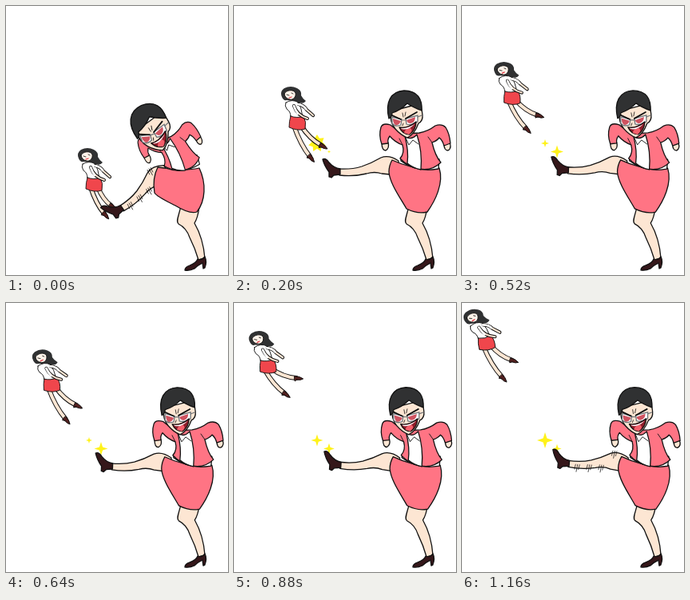
These frames come from a looping animation (278x337 px, 1.2 s). An HTML page:

```html
<!DOCTYPE html>
<html lang="en">
<head>
<meta charset="utf-8">
<title>Kick</title>
<style>
html, body { margin: 0; width: 100%; height: 100%; overflow: hidden; background: #fff; }
svg { display: block; width: 100vw; height: 100vh; }
.ink { stroke: #111; stroke-width: 1.3; stroke-linejoin: round; stroke-linecap: round; }
.thin { stroke-width: .9; }
.pink { fill: #ff7484; }
.red { fill: #f0464c; }
.skin { fill: #fde6d3; }
.white { fill: #fff; }
.hair { fill: #303132; }
.shoe { fill: #35171a; }
.line { fill: none; stroke: #111; stroke-linecap: round; stroke-linejoin: round; }
.limb { fill: none; stroke: #fde6d3; stroke-linecap: round; stroke-linejoin: round; }
.gold { fill: #fff21a; }
</style>
</head>
<body>
<svg viewBox="0 0 278 337">
  <path id="burst" class="gold"/>
  <path id="sparkA" class="gold"/>
  <path id="sparkB" class="gold"/>

  <g id="girl">
    <g id="legs"></g>
    <g id="body">
      <path class="hair" d="M-11,3 Q-14,-4 -8,-8 Q0,-12 8,-8 Q14,-5 13,1 Q15,5 19,8 Q16,12 11,10 Q7,13 4,8 L-5,7 Q-9,8 -11,3 Z"/>
      <path class="white ink thin" d="M-6,10 Q2,5 10,10 L13,18 L15,28 Q8,31 0,28 Q0,21 -5,18 Q-8,14 -6,10 Z"/>
      <path class="red ink thin" d="M0,27 Q8,30 16,27 Q20,34 18,43 Q9,46 -2,41 Q-2,33 0,27 Z"/>
      <g id="arms"></g>
      <path class="ink thin" fill="#fff4ea" d="M-8,-1 C-6,-6 4,-7 6,-2 C7,3 3,7 -1,6 Q-7,5 -8,-1 Z"/>
      <path class="line" stroke-width=".8" d="M-5,0 l3,1 M1,-2 l2,1"/>
      <path class="line" style="stroke:#e03540" stroke-width="1.3" d="M-2,4 l3,-1"/>
    </g>
  </g>

  <g id="kicker">
    <g id="kickLeg">
      <path class="skin ink" d="M206,194 Q194,186 184,190 Q172,197 160,201 Q147,205 131,204 L132,212 Q150,214 166,210 Q176,207 185,210 L206,212 Z"/>
      <path class="shoe ink" d="M111,192 Q115,190 119,196 Q125,203 133,204 L133,211 L125,212 L122,215 L119,214 L119,208 Q113,200 111,192 Z"/>
      <path id="shake" class="line" stroke-width=".7"/>
    </g>
    <path class="skin ink" d="M219,250 C217,262 212,270 216,273 Q226,278 230,290 Q237,304 241,318 L249,316 Q247,291 236,272 Q240,266 242,252 Z"/>
    <path class="shoe ink" d="M240,317 Q245,319 249,314 Q252,320 249,328 L247,329 L246,322 Q240,325 236,329 Q230,332 224,331 Q224,327 230,325 Q238,322 240,317 Z"/>
    <path id="skirt" class="pink ink"/>
    <g id="torso">
      <path class="skin ink" d="M185,171 L193,171 Q195,178 190,181 Q185,181 185,171 Z"/>
      <path class="skin ink" d="M263,173 L270,171 Q273,178 268,181 Q263,181 263,173 Z"/>
      <path class="white ink" d="M209,190 L257,192 L256,204 Q228,209 209,194 Z"/>
      <path class="pink ink" d="M216,160 C207,159 201,153 196,149 Q186,146 184,152 Q181,162 185,173 L193,172 Q192,167 195,163 Q202,171 211,174 Q214,184 208,191 Q217,201 232,204 Q248,207 259,196 Q252,188 248,171 Q254,169 257,165 Q261,168 263,175 L271,172 Q270,160 265,152 Q260,147 252,150 Q243,157 232,159 Z"/>
      <path class="white ink" d="M214,163 Q222,169 229,161 Q236,182 234,205 Q224,203 217,197 Q219,182 214,163 Z"/>
      <path class="line" stroke-width=".9" d="M215,165 L219,174 L224,168 L231,173 M211,174 L207,166 M248,171 L243,164"/>
    </g>
    <g id="head">
      <path class="skin ink" d="M196,132 Q195,146 202,154 Q209,162 217,165 Q226,161 231,147 Q237,144 236,136 L234,122 Z"/>
      <path class="hair ink" d="M194,141 C189,121 196,107 213,106 C230,106 236,117 235,131 Q224,127 217,122 Q208,131 198,134 Q198,139 194,141 Z"/>
      <path d="M198,139 L210,142 L209,149 Q202,152 198,147 Z M215,141 L230,137 L230,145 Q222,150 216,148 Z" fill="#fff" stroke="#6d7377" stroke-width="1.3"/>
      <path class="line" style="stroke:#6d7377" stroke-width="1.2" d="M210,143 L215,143 M230,139 L235,137"/>
      <path fill="#cf5360" d="M199,141 L209,144 Q207,150 202,149 Q199,147 199,141 Z M216,143 L227,139 Q227,146 221,147 Q217,147 216,143 Z"/>
      <path class="line" stroke-width="1.8" d="M198,137 L209,142 M229,133 L215,141"/>
      <path class="line" stroke-width=".8" d="M211,134 l1,5 M215,133 l-1,5 M212,147 l-1,3"/>
      <path class="ink" fill="#8e1c29" d="M207,152 Q217,154 228,145 Q228,155 220,161 Q211,161 207,152 Z"/>
      <path fill="#f4606c" d="M213,159 Q214,153 221,153 Q225,156 219,161 Z"/>
      <path fill="#fff" d="M209,153 Q217,154 226,148 L224,150 Q217,156 210,154 Z"/>
    </g>
  </g>
</svg>
<script>
const LOOP = 1200, STEP = 40, HIT = 200, TURN = Math.PI * 2;
const el = id => document.getElementById(id);
const set = (id, name, value) => el(id).setAttribute(name, value);
const clamp = v => Math.max(0, Math.min(1, v));

function star(x, y, r, points = 4, inner = .34) {
  let d = '';
  for (let i = 0; i < points * 2; i++) {
    const a = i * Math.PI / points - Math.PI / 2, q = i % 2 ? r * inner : r;
    d += `${i ? 'L' : 'M'}${x + q * Math.cos(a)},${y + q * Math.sin(a)}`;
  }
  return d + 'Z';
}

const limb = (d, width) => `<path class="line" stroke-width="${width + 2}" d="${d}"/>
  <path class="limb" stroke-width="${width}" d="${d}"/>`;

function girlLeg([hx, hy], fx, fy) {
  const kx = (hx + fx) / 2 - 2, ky = (hy + fy) / 2 + 4;
  const turn = Math.atan2(fy - ky, fx - kx) * 360 / TURN;
  return limb(`M${hx},${hy} Q${kx},${ky} ${fx},${fy}`, 4) +
    `<path class="ink thin" fill="#52201f" transform="translate(${fx},${fy}) rotate(${turn})"
      d="M-2,-2.2 Q4,-3 9,0 Q6,2.5 1,2 L-1,4 L-2,2 Z"/>`;
}

// Clusters of short strokes along the kicking leg
function shakePath() {
  let d = '';
  for (let c = 0; c < 4; c++)
    for (let i = 0; i < 3; i++)
      d += `M${141 + c * 15 + i * 2.5},${c < 3 ? 208 - c : 187}l-1,${6 + i % 2 * 3}`;
  return d;
}

// k = 1 crouched, 0 upright
const skirtPath = k => `M${198 - 8 * k},${193 + 9 * k} Q228,207 ${257 - 15 * k},203
  C${263 - 12 * k},222 ${252 - 2 * k},244 ${242 - 3 * k},258 Q230,261 ${216 - 4 * k},${254 - 4 * k}
  C${208 - 8 * k},${240 + 4 * k} ${195 - 6 * k},${222 + 17 * k} ${194 - 8 * k},${208 + 26 * k}
  Q${194 - 11 * k},${200 + 16 * k} ${198 - 8 * k},${193 + 9 * k} Z`;

function drawGirl(bend, u, sway) {
  const lean = 11 * u + 3 * sway * u;
  const r = lean * TURN / 360;
  const hip = (x, y) => [x * Math.cos(r) + y * Math.sin(r), y * Math.cos(r) - x * Math.sin(r)];
  set('girl', 'transform', `translate(${71 - 57 * u + 31 * bend},${111 - 93 * u + 77 * bend})`);
  set('body', 'transform', `rotate(${-lean})`);
  el('legs').innerHTML =
    girlLeg(hip(4, 39), 24 + 12 * u - 3 * bend, 74 - 3 * u + 4 * sway) +
    girlLeg(hip(13, 39), 39 + 10 * u - sway - 10 * bend, 60 - 10 * u + 4 * sway + 4 * bend);
}

function drawKicker(bend, u) {
  set('kicker', 'transform', `rotate(${.8 * u} 240 325)`);
  set('kickLeg', 'transform',
    `translate(${200 - 4 * bend},${200 + 8 * bend}) rotate(${4.3 * u - 35 * bend}) translate(-200,-200)`);
  set('torso', 'transform',
    `translate(${220 - 7 * bend},${205 + 5 * bend}) rotate(${-20 * bend}) scale(${1 - .12 * bend},1) translate(-220,-205)`);
  set('head', 'transform',
    `translate(${213 - 33 * bend},${133 + 18 * bend}) rotate(${-22 * bend}) scale(${1 + .05 * bend}) translate(-213,-133)`);
  set('skirt', 'd', skirtPath(bend));
}

function drawSparks(t) {
  const pulse = Math.cos(TURN * (t - 640) / 900);
  set('sparkA', 'd', star(104, 172, clamp((t - HIT) / 150) * (7.2 - 3.2 * pulse)));
  set('sparkB', 'd', star(119, 182.5, clamp((t - 140) / 150) * (7 + 1.5 * pulse)));
  set('burst', 'd', star(104, 172, 11 * clamp(2 - Math.abs(t - HIT) / 60), 7, .62));
}

function draw(t) {
  const bend = (1 - clamp(t / HIT)) ** 2;
  const u = clamp((t - HIT) / 960);
  drawGirl(bend, u, Math.cos(TURN * (t - 640) / 480));
  drawKicker(bend, u);
  drawSparks(t);
  set('shake', 'visibility', t < 80 || t >= 1120 ? 'visible' : 'hidden');
}

el('arms').innerHTML = limb('M4,14 Q8,26 21,30', 2) + limb('M10,12 Q17,14 20,19 L28,26', 2.2) +
  '<path class="limb" style="stroke:#fff" stroke-width="2.6" d="M9,12 Q16,13 19,18 M4,14 Q6,20 9,24"/>';
set('shake', 'd', shakePath());
const start = performance.now();
function tick() {
  const t = (performance.now() - start) % LOOP;
  draw(Math.floor(t / STEP) * STEP);
  requestAnimationFrame(tick);
}
draw(0);
requestAnimationFrame(tick);
</script>
</body>
</html>
```
